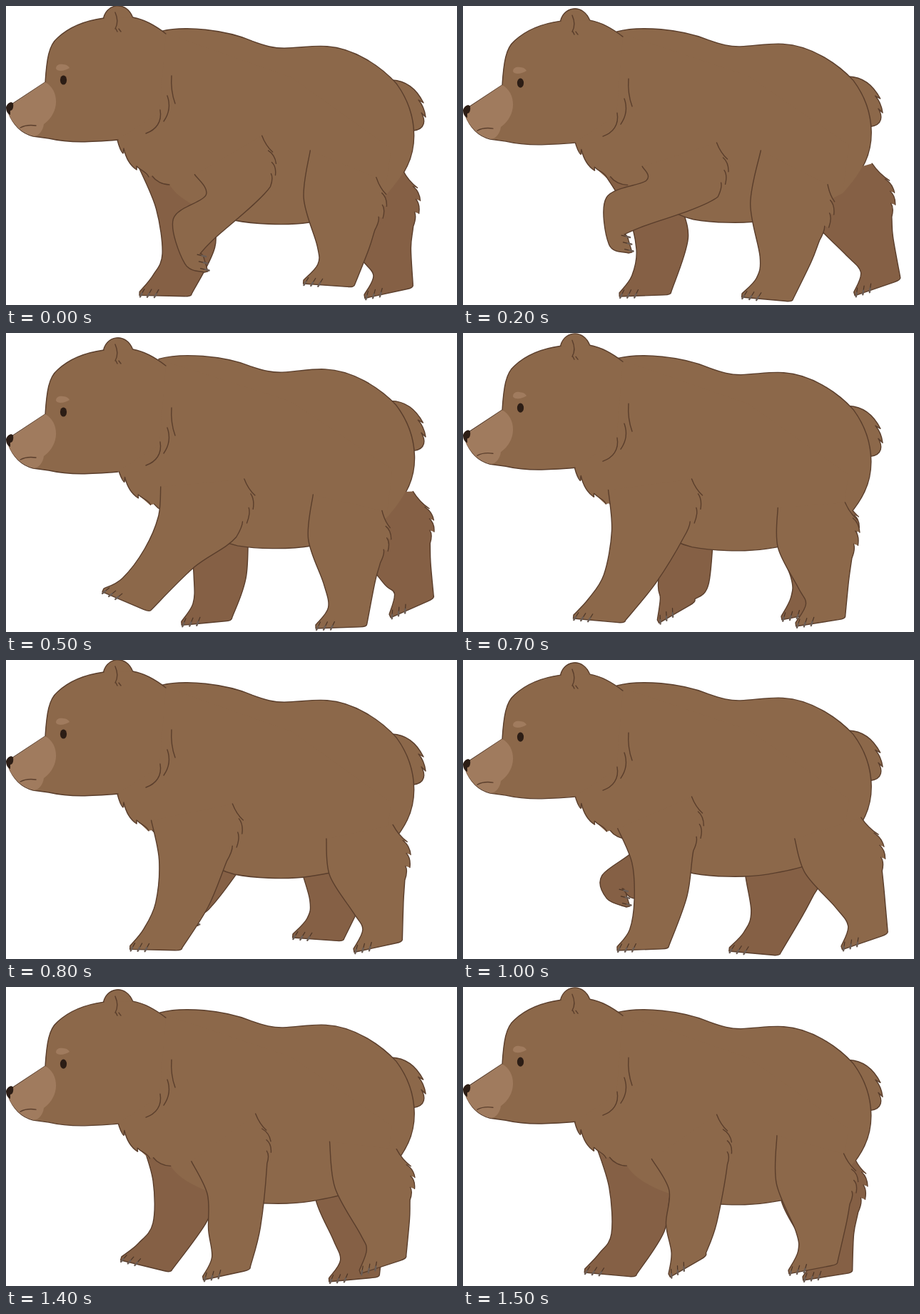
Recreate the animation shown at these times as an HTML page. Size 632 by 420 pixels, loop 1600 ms.

```html
<!DOCTYPE html>
<html lang="en">
<head>
<meta charset="utf-8">
<title>Walking bear</title>
<style>
  html, body { margin: 0; width: 100%; height: 100%; overflow: hidden; background: #fff; }
  svg { display: block; width: 632px; height: 420px; }
  .fur { fill: #8c684a; }
  .far { fill: #856045; }
  .pale { fill: #a07b5e; }
  .dark { fill: #2c1d15; }
  .edge { stroke: #5a3e2c; stroke-width: 1.4; stroke-linecap: round; stroke-linejoin: round; }
  .line { fill: none; }
  .rim { stroke-width: 2.8; }
  .claw { fill: none; stroke: #6b5d55; stroke-width: 2.4; stroke-linecap: round; }
  .crease { fill: none; stroke: #4b3527; stroke-width: 1.2; stroke-linecap: round; }
</style>
</head>
<body>
<svg viewBox="0 0 632 420">
  <defs>
    <path id="back" d="M218 36C250 28 308 34 345 50C364 57 375 60 390 60C415 59 432 56 450 57.500C487 60 525 85 547 110C565 135 571 160 571 182C571 212 560 236 530 268"/>
  </defs>
  <g class="torso">
    <path class="fur edge" d="M541 104C562 105 576 118 585 136L578 132C585 140 587 148 588 156L582 150C588 160 588 173 571 175"/>
    <use href="#back" class="edge line rim"/>
  </g>
  <g id="farLegs"></g>
  <g class="torso">
    <use href="#back" class="fur"/>
    <path class="fur" d="M530 268L480 292C465 298 445 301 425 304C390 309 345 306 320 301C285 290 245 277 229 251C219 251 210 246 205 239L199 240L183 225L184 230C174 224 168 214 165 200L166 207C160 203 158 196 156 188L150 100L218 36L400 100L540 200Z"/>
    <path class="edge line" d="M298 293C306 297 312 299 320 301C345 306 390 309 425 304C445 301 465 298 480 292"/>
    <path class="edge line" d="M156 188C158 196 160 203 164 207L165 200C168 214 174 224 183 230L183 225C190 232 197 233 200 240M205 239C210 246 219 251 229 251"/>
  </g>
  <g id="nearLegs"></g>
  <g id="head">
    <path class="fur edge" d="M136 21C138 -4 169 -9 178 17L160 40Z"/>
    <path class="fur" d="M224 39C210 28 195 19 178 16L137 17C115 20 90 28 72 45C60 55 57 75 55 107L38 183L60 186C90 193 120 191 157 188L215 150Z"/>
    <path class="edge line" d="M178 16C195 19 210 28 224 39M137 17C115 20 90 28 72 45C60 55 57 75 55 107L8 138M3 149C10 167 22 179 38 183L60 186C90 193 120 191 157 188"/>
    <path class="pale" d="M55 107C75 118 76 150 53 166C52 175 46 182 40 183C22 179 10 167 3 150L9 138Z"/>
    <path class="dark" d="M0 142C2 136 8 133 10 137C11 143 9 147 6 147L6 153C2 151 0 148 0 142Z"/>
    <path class="pale" d="M70 88C70 82 76 81 80 82C85 82 88 85 89 87C84 91 72 93 70 88Z"/>
    <ellipse class="dark" cx="80.500" cy="104" rx="4.600" ry="6.600"/>
    <path class="edge line" d="M20 171C27 167 35 167 42 168M153 9C157 18 157 25 153 32M154 32L156 36M158 32L161 36"/>
    <path class="edge line" d="M232 98C231 112 233 126 237 137M226 126C231 140 228 152 221 162M216 146C219 163 210 174 196 179"/>
  </g>
</svg>
<script>
const STEPS = 16, STEP_MS = 100;

// Gait keys: time, toe x, toe y, foot tilt in degrees, knee x, knee y.
const frontGait = [
  [0, 278, 374, -103, 263, 313],
  [2, 232, 347, -103, 225, 290],
  [4, 105, 353, 25, 200, 316],
  [5, 137, 359, 24, 229, 316],
  [7, 155, 396, 6, 234, 345],
  [10, 216, 403, -1, 277, 334],
  [12, 243, 404, 0, 298, 346],
  [15, 288, 403, -29, 320, 332]
];
const hindGait = [
  [0, 417, 385, 5, 472, 340],
  [2, 391, 404, 6, 452, 356],
  [5, 434, 410, -1, 481, 351],
  [7, 466, 407, -8, 505, 352],
  [10, 530, 402, -18, 556, 336],
  [12, 559, 394, -26, 578, 337],
  [15, 456, 398, -10, 502, 337]
];

const add = (p, q, k = 1) => [p[0] + q[0] * k, p[1] + q[1] * k];
const mix = (p, q, k) => [p[0] + (q[0] - p[0]) * k, p[1] + (q[1] - p[1]) * k];
const str = p => p.map(v => v.toFixed(1)).join(' ');
const dir = deg => [Math.cos(deg * Math.PI / 180), Math.sin(deg * Math.PI / 180)];
const wave = (t, peak) => Math.cos((t - peak) * 2 * Math.PI / STEPS);

// Cyclic cubic interpolation between the gait keys.
function gaitAt(keys, t) {
  const n = keys.length;
  const key = i => keys[(i + n) % n];
  const time = i => key(i)[0] + Math.floor(i / n) * STEPS;
  let i = n - 1;
  while (key(i)[0] > t) i--;
  const h = time(i + 1) - time(i), s = (t - time(i)) / h;
  return [1, 2, 3, 4, 5].map(c => {
    const slope = k => (key(k + 1)[c] - key(k - 1)[c]) / (time(k + 1) - time(k - 1)) * h;
    const a = key(i)[c], d = key(i + 1)[c] - a, m = slope(i), w = slope(i + 1);
    return a + s * (m + s * (3 * d - 2 * m - w + s * (m + w - 2 * d)));
  });
}

// Outline of a foreleg: the shoulder sways with the stride, the wrist folds when lifted.
function foreleg(t, [, , tilt, kx, ky], hipShift) {
  const fold = Math.max(0, -tilt);
  const hip = 287 + 31 * wave(t, -0.5) + hipShift;
  const lean = 0.65 * Math.atan2(hip - kx, ky - 250) * 180 / Math.PI;
  const half = 37 - 0.05 * fold;
  const top = [hip - 53, 231 + 15 * wave(t, 13)];
  const shin = add([kx, ky], dir(lean), -half);
  const root = [338 + 21 * wave(t, 0.5) + hipShift, 192 - 14 * wave(t, 14)];
  return {
    top, shin, root,
    bend: add(mix(top, shin, 0.5), [8 + 0.22 * fold, -2]),
    calf: add([kx, ky], dir(lean), half),
    elbow: [hip + 53, 268 - 20 * wave(t, 14)],
    tuft: add(root, [15, 23]),
    length: 73 - 0.45 * fold
  };
}

// Outline of a hind leg: thigh and haunch follow the shin.
function hindLeg(t, [, , tilt, kx, ky], hipShift) {
  const shin = add([kx, ky], dir(tilt), -36);
  const calf = add([kx, ky], dir(tilt), 36);
  const top = [0.45 * shin[0] + 230, 227 + 26 * wave(t, 9)];
  const tuft = [555 + 0.6 * (calf[0] - 545) + hipShift, 260 + 17 * wave(t, 3.3)];
  return {
    top, shin, calf, tuft,
    bend: add(mix(top, shin, 0.5), [-14, 0]),
    elbow: mix(calf, tuft, 0.36),
    root: add(tuft, [8 * wave(t, 3) - 17, -24]),
    length: 72 - 0.2 * Math.max(0, -tilt)
  };
}

// Smooth path through p[from] .. the last point.
function spline(p, from = 0) {
  const at = i => p[Math.max(0, Math.min(p.length - 1, i))];
  let d = '';
  for (let i = from; i < p.length - 1; i++) {
    const c1 = add(at(i), add(at(i + 1), at(i - 1), -1), 1 / 6);
    const c2 = add(at(i + 1), add(at(i + 2), at(i), -1), -1 / 6);
    d += `C${str(c1)} ${str(c2)} ${str(at(i + 1))}`;
  }
  return d;
}

// "N" marks a notch: joined in the fill, a gap in the line.
function tufts(first, last) {
  let d = '', tip = first;
  for (let i = 1; i <= 3; i++) {
    const next = add(mix(first, last, i / 3), [i < 3 ? 6 : 0, 0]);
    const notch = add(tip, [-6, -2]);
    d += `N${str(notch)}Q${str(add(mix(notch, next, 0.5), [4, -3]))} ${str(next)}`;
    tip = next;
  }
  return d;
}

function makeLeg({ parent, gait, build, far, sway = 0, peak = 0, drop = 0, hipShift = 0 }) {
  const names = [far ? 'far' : 'fur', 'edge line', 'crease', 'claw'];
  const [fill, line, crease, claw] = names.map(name => {
    const el = document.createElementNS('http://www.w3.org/2000/svg', 'path');
    el.setAttribute('class', name);
    return document.getElementById(parent).appendChild(el);
  });
  return now => {
    const t = (now + (far ? STEPS / 2 : 0)) % STEPS;
    const pose = gaitAt(gait, t);
    const shift = sway * wave(t, peak);
    pose[0] += shift;
    pose[3] += 0.7 * shift;
    pose[4] += drop * Math.max(0, wave(t, 1));

    const { top, bend, shin, calf, elbow, root, tuft, length } = build(t, pose, hipShift);
    const toe = pose.slice(0, 2);
    const u = dir(pose[2]), down = [-u[1], u[0]];
    const ankle = add(add(toe, u, 18), down, -24);
    const heel = add(toe, u, length);
    const pad = add(heel, down, 4);
    const sole = add(toe, down, 5);
    const d = `M${str(root)}Q${str(add(mix(root, tuft, 0.5), [-2, 3]))} ${str(tuft)}`
      + tufts(tuft, elbow)
      + spline([tuft, elbow, calf, heel], 1)
      + `Q${str(pad)} ${str(add(pad, u, -10))}L${str(sole)}L${str(toe)}`
      + spline([toe, ankle, shin, bend, top]);
    fill.setAttribute('d', d.replaceAll('N', 'L'));
    line.setAttribute('d', d.replaceAll('N', 'M'));

    const claws = size => [0, 1, 2].map(i => {
      const p = add(add(sole, u, 1 + 10 * i), down, 2);
      return `M${str(p)}L${str(add(p, add([u[0] / 2, u[1] / 2], down, -1), size))}`;
    }).join('');
    crease.setAttribute('d', claws(11));
    claw.setAttribute('d', claws(5));
  };
}

const hind = { gait: hindGait, build: hindLeg };
const front = { gait: frontGait, build: foreleg };
const legs = [
  makeLeg({ ...hind, parent: 'farLegs', far: true, sway: 18, peak: 9.5, hipShift: 8 }),
  makeLeg({ ...front, parent: 'farLegs', far: true, sway: 16, peak: 6.5, drop: 30, hipShift: -18 }),
  makeLeg({ ...hind, parent: 'nearLegs' }),
  makeLeg({ ...front, parent: 'nearLegs' })
];
const torso = document.querySelectorAll('.torso');
const head = document.getElementById('head');
let shown = -1;

function draw() {
  const t = Math.floor(performance.now() / STEP_MS) % STEPS;
  if (t !== shown) {
    shown = t;
    const bob = (1 - wave(2 * t, 0)) / 2;
    head.setAttribute('transform', `translate(0 ${(bob * 8.2).toFixed(2)})`);
    torso.forEach(g => g.setAttribute('transform', `rotate(${(-2 * bob).toFixed(3)} 250 150)`));
    legs.forEach(leg => leg(t));
  }
  requestAnimationFrame(draw);
}
draw();
</script>
</body>
</html>
```
